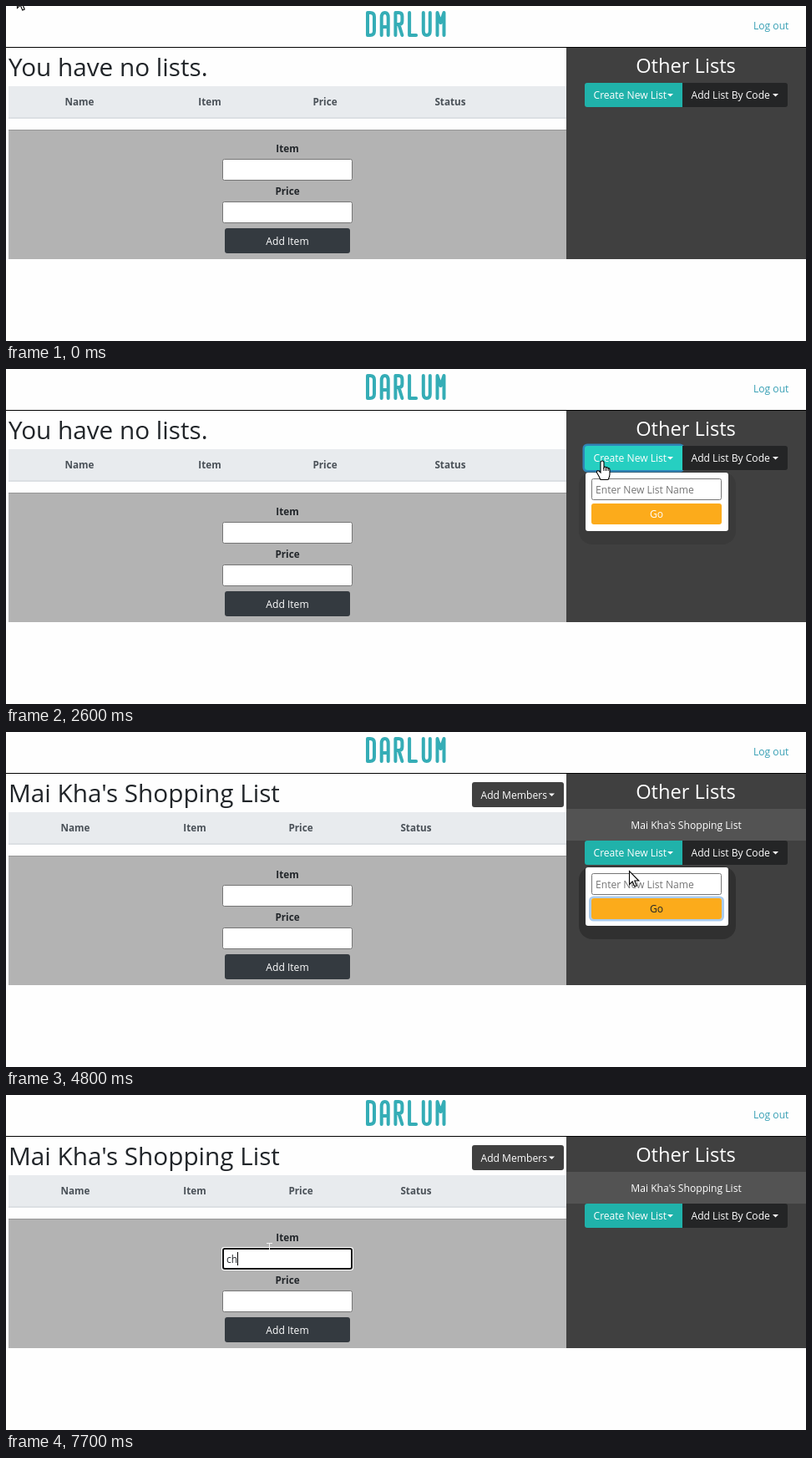
Write an HTML page with a canvas that moves like this. It is 958x401 px and loops after 8 s.

```html
<!DOCTYPE html>
<html lang="en">
<head>
<meta charset="utf-8">
<title>Shopping lists</title>
<style>
html, body { margin: 0; width: 100%; height: 100%; overflow: hidden; background: #fefefe; }
canvas { display: block; }
</style>
</head>
<body>
<canvas id="stage" width="958" height="401"></canvas>
<script>
const ctx = document.getElementById('stage').getContext('2d');
const LOOP = 8000, INK = '#212529', TEAL = '#20b2aa';
const LIST = "Mai Kha's Shopping List";

// Pointer path: time, x, y
const PATH = [
  [0, 13, -14], [400, 13, -14], [600, 5, 40], [800, 20, 150], [1000, 120, 206],
  [1300, 348, 112], [1700, 560, 92], [2000, 705, 108], [2100, 714, 110], [2700, 714, 110],
  [3000, 740, 137], [3800, 740, 137], [4000, 742, 161], [4200, 741, 166], [4300, 741, 166],
  [4500, 746, 166], [5000, 746, 166], [5200, 830, 130], [5400, 843, 80], [5600, 700, 73],
  [5800, 623, 190], [5900, 629, 236], [6100, 629, 236], [6500, 330, 185], [6600, 330, 185],
  [6800, 315, 181], [8000, 315, 181]
];
const ARROW = new Path2D('M.5 .5V16.5L4.2 13L6.8 19L9.2 18L6.8 12H11.8Z');
const HAND = new Path2D('M-2 2Q-2 0 0 0T2 2V8Q3 6 4.5 8Q6 7 7 9Q9 8 9 11V16Q9 19 7 22.5H-2Q-4 18 -6.5 14Q-7 11 -4 12L-2 14Z');
const GLYPHS = [
  'M0 0V27H3Q8 27 8 22V5Q8 0 3 0Z',
  'M0 27V6Q0 0 4 0T8 6V27M0 17H8',
  'M0 27V0H4Q8 0 8 4V10Q8 14 4 14H0M4 14L8 27',
  'M0 0V27H8',
  'M0 0V22Q0 27 4 27T8 22V0',
  'M0 27V0L4 12L8 0V27'
].map(d => new Path2D(d));

function rect(x, y, w, h, fill) {
  ctx.fillStyle = fill;
  ctx.fillRect(x, y, w, h);
}

function round(x, y, w, h, r, fill, stroke, weight = 1) {
  ctx.beginPath();
  ctx.roundRect(x, y, w, h, r);
  if (fill) { ctx.fillStyle = fill; ctx.fill(); }
  if (stroke) { ctx.strokeStyle = stroke; ctx.lineWidth = weight; ctx.stroke(); }
}

function text(str, x, y, color = '#fff', { size = 12.1, weight = 400, align = 'left' } = {}) {
  ctx.font = `${weight} ${size}px "Open Sans", "Noto Sans", sans-serif`;
  ctx.textAlign = align;
  ctx.fillStyle = color;
  ctx.fillText(str, x, y);
  return ctx.measureText(str).width;
}

const centered = (str, x, y, color, size) => text(str, x, y, color, { size, align: 'center' });
const label = (str, x, y, color) => text(str, x, y, color, { size: 11.7, weight: 700, align: 'center' });

function dropButton(str, x, y, w, h, r, fill) {
  round(x, y, w, h, r, fill);
  text(str, x + 10.5, y + h / 2 + 4.5);
  const cx = x + w - 18, cy = y + h / 2 - 1.5;
  ctx.beginPath();
  ctx.moveTo(cx, cy);
  ctx.lineTo(cx + 7, cy);
  ctx.lineTo(cx + 3.5, cy + 3.5);
  ctx.fill();
}

function field(x, y, focused) {
  if (!focused) return round(x + .5, y + .5, 155, 25, 2, '#fff', '#767676');
  round(x - 1, y - 1, 158, 28, 3, '#fff');
  round(x + 1, y + 1, 154, 24, 2, '#fff', '#101010', 2);
}

function squiggle(x, y, w) {
  ctx.beginPath();
  for (let i = 0; i <= w; i++) ctx.lineTo(x + i, y + Math.sin(i * Math.PI / 2));
  ctx.strokeStyle = '#e33';
  ctx.lineWidth = 1;
  ctx.stroke();
}

function typedCount(t) {
  if (t < 3200) return 0;
  if (t < 3600) return t < 3300 ? 1 : 2;
  return Math.min(LIST.length, 8 + (t - 3600) / 100 * 8);
}

function menu(t, y, created) {
  round(686, y - 1, 188, 87, 16, created ? '#303030' : '#3a3a3a');
  round(694, y, 171, 70, 3, '#fff');
  const focused = t >= 3000 && !created;
  field(701, y + 7, focused);
  const typed = created ? '' : LIST.slice(0, typedCount(t));
  const width = text(typed || 'Enter New List Name', 706, y + 25, typed ? INK : '#757575');
  if (focused) rect(706 + (typed ? width : 0), y + 13, 1, 15, '#000');
  if (typed.length > 8) {
    const [first, second] = LIST.split(' ');
    squiggle(706, y + 28, ctx.measureText(first).width);
    squiggle(706 + ctx.measureText(first + ' ').width, y + 28, ctx.measureText(second).width);
  }
  if (created) round(699.5, y + 36, 159, 27, 4, null, '#a9cbed', 3);
  round(701, y + 37, 156, 25, 3, '#fcab1b');
  centered('Go', 779, y + 54, t >= 4100 ? INK : '#fff');
}

function wordmark() {
  ctx.strokeStyle = '#35adb6';
  ctx.lineWidth = 4;
  ctx.lineCap = ctx.lineJoin = 'round';
  GLYPHS.forEach((glyph, i) => {
    ctx.save();
    ctx.translate(433 + i * 16.7, 8);
    ctx.stroke(glyph);
    ctx.restore();
  });
  ctx.lineCap = 'butt';
  ctx.lineJoin = 'miter';
}

function pointer(t) {
  const i = PATH.findIndex(key => key[0] > t);
  const [t0, x0, y0] = PATH[i - 1], [t1, x1, y1] = PATH[i];
  const k = (t - t0) / (t1 - t0);
  const x = Math.round(x0 + (x1 - x0) * k), y = Math.round(y0 + (y1 - y0) * k);
  if ((t >= 2900 && t < 3900) || t >= 6500) {
    const color = t < 6500 ? '#333' : '#f4f4f4';
    rect(x, y - 4, 1, 9, color);
    rect(x - 3, y - 4, 7, 1, color);
    rect(x - 3, y + 4, 7, 1, color);
    return;
  }
  const hand = (t >= 2000 && t < 2900) || (t >= 3900 && t < 4700);
  ctx.save();
  ctx.translate(x, y);
  ctx.fillStyle = '#fff';
  ctx.strokeStyle = '#000';
  ctx.lineWidth = 1.1;
  ctx.fill(hand ? HAND : ARROW);
  ctx.stroke(hand ? HAND : ARROW);
  if (hand) for (const dx of [2, 4.5, 7]) rect(dx - .5, 8, 1, 4, '#000');
  ctx.restore();
}

function draw(t) {
  const created = t >= 4700;
  const shift = created ? 38 : 0;
  rect(0, 0, 958, 401, '#fefefe');
  wordmark();
  text('Log out', 895, 28, '#379fb4');
  rect(0, 49, 958, 1, '#000');

  // List table
  text(created ? LIST : 'You have no lists.', 3, 84, INK, { size: 29.7, weight: 500 });
  if (created) dropButton('Add Members', 558, 60, 110, 30, 3, '#404040');
  rect(3, 96, 668, 38, '#e8ebee');
  rect(3, 133, 668, 2, '#dcdfe3');
  const columns = created ? [83, 226, 353, 491] : [88, 244, 382, 532];
  ['Name', 'Item', 'Price', 'Status'].forEach((name, i) => label(name, columns[i], 119, '#495057'));

  // Item form
  rect(3, 148, 668, 155, '#b3b3b3');
  rect(3, 148, 668, 1, '#969696');
  label('Item', 337, 175, INK);
  field(259, 183, t >= 6700);
  const item = 'ch'.slice(0, t < 7600 ? 0 : t < 7700 ? 1 : 2);
  const itemWidth = text(item, 264, 201, INK);
  if (t >= 6800 && (t < 7300 || item)) rect(264 + Math.round(itemWidth), 188, 1, 16, '#000');
  label('Price', 337, 226, INK);
  field(259, 234);
  round(262, 266, 150, 30, 3, '#343a40');
  centered('Add Item', 337, 286);

  // Side panel
  rect(671, 50, 287, 253, '#404040');
  text('Other Lists', 814, 80, '#fff', { size: 23.7, weight: 500, align: 'center' });
  if (created) {
    rect(671, 92, 287, 38, '#535353');
    centered(LIST, 814.5, 116);
  }
  const open = t >= 2300 && t < 6000;
  if (open) menu(t, 124 + shift, created);
  if (t >= 2300 && t < 3000) round(692, 91, 119, 31, 4, null, '#2f86b8', 3);
  const hover = t >= 2000 && t < 2900;
  const createFill = hover ? (t < 2100 ? '#23c2b5' : '#26cfc1') : TEAL;
  dropButton('Create New List', 693, 92 + shift, 117, 29, [3, 0, 0, 3], createFill);
  dropButton('Add List By Code', 810, 92 + shift, 126, 29, [0, 3, 3, 0], '#242526');

  pointer(t);
}

function tick() {
  draw(Math.floor(performance.now() % LOOP / 100) * 100);
  requestAnimationFrame(tick);
}
tick();
</script>
</body>
</html>
```
